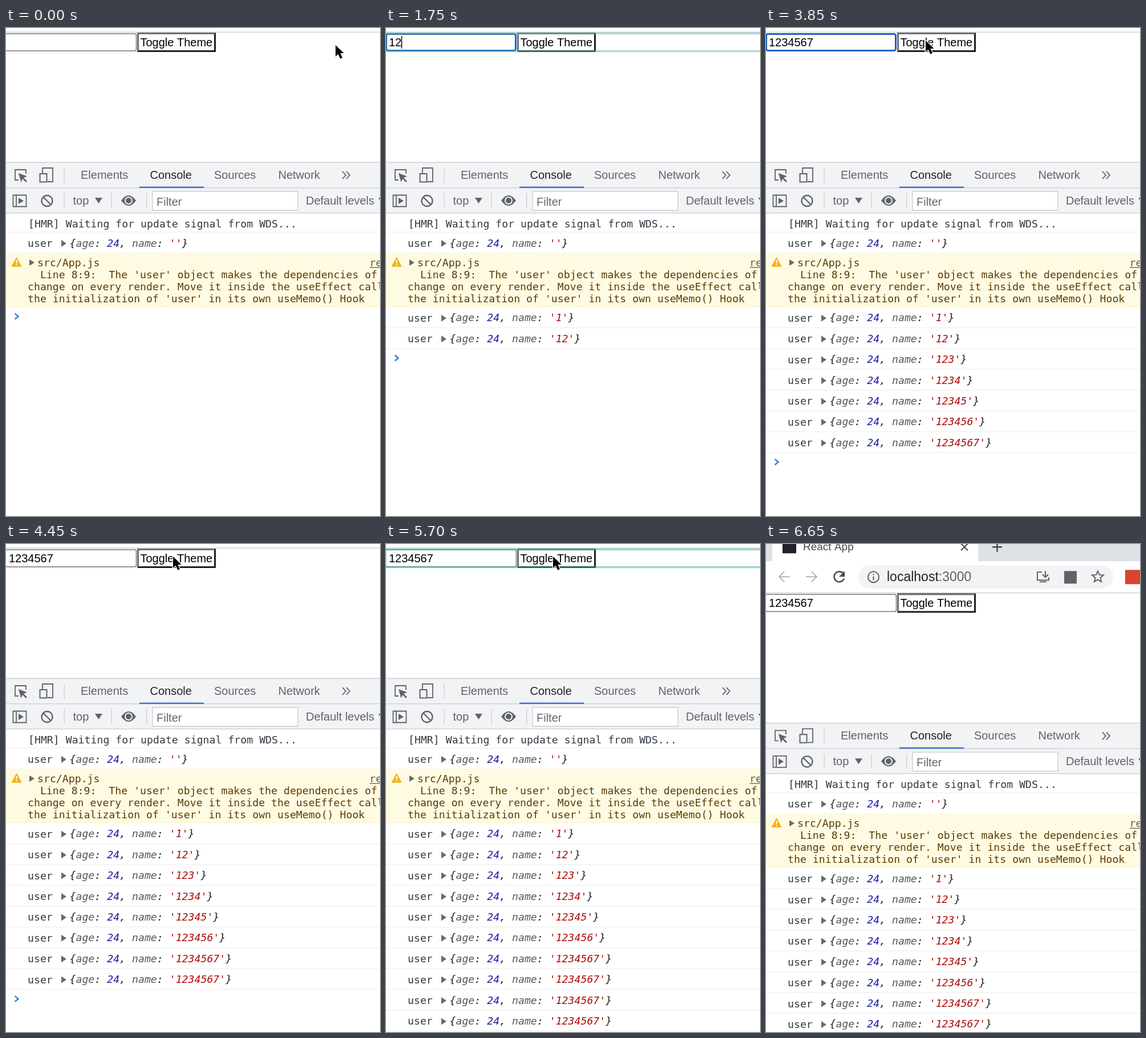
These frames come from a looping animation (656x854 px, 6.7 s). An HTML page with a canvas:

```html
<!DOCTYPE html>
<html lang="en">
<head>
<meta charset="utf-8">
<title>Console logging demo</title>
<style>
  html, body { margin: 0; width: 100%; height: 100%; overflow: hidden; background: #fff; }
  canvas { display: block; }
</style>
</head>
<body>
<canvas id="stage" width="656" height="854"></canvas>
<script>
const ctx = document.getElementById('stage').getContext('2d');
const W = 656, H = 854, LOOP = 6700, STEP = 50;
const SANS = '"Liberation Sans", Arial, sans-serif';
const MONO = '18.2px "DejaVu Sans Mono", monospace';
const ROW = 36.4;
const GRAY = '#5f6368', LINE = '#cacdd1';

// Timeline, in ms
const typedAt = [1050, 1550, 1950, 2150, 2450, 2700, 3050];
const loggedAt = [1550, 1750, 2000, 2200, 2500, 2750, 3100, 4250, 4700, 5200];
const clickedAt = [4200, 4650, 5200, 5650];
const flashColors = ['#37afa9', '#63b19e', '#80b393', '#97b488', '#abb67d', '#beb771', '#cfb965'];
const FOCUS = 650, BLUR = clickedAt[0];
const pointerPath = [
  [0, 577, 29], [150, 520, 34], [300, 350, 32], [450, 200, 26], [600, 149, 24],
  [3550, 149, 24], [3600, 158, 24], [3700, 160, 24], [3850, 279, 21], [3950, 292, 21],
  [6050, 292, 21], [6200, 310, -50], [6400, 330, -160]
];

const countBefore = (times, t) => times.filter(time => time <= t).length;
const clamp = v => Math.max(0, Math.min(1, v));
const ease = v => v * v * (3 - 2 * v);

function positionAt(t) {
  const next = pointerPath.findIndex(key => key[0] > t);
  if (next < 0) return pointerPath[pointerPath.length - 1].slice(1);
  const [t0, x0, y0] = pointerPath[next - 1], [t1, x1, y1] = pointerPath[next];
  const k = (t - t0) / (t1 - t0);
  return [x0 + (x1 - x0) * k, y0 + (y1 - y0) * k];
}

function rect(x, y, w, h, color) {
  ctx.fillStyle = color;
  ctx.fillRect(x, y, w, h);
}

function box(x, y, w, h, radius, fill, stroke, width = 1.5) {
  ctx.beginPath();
  ctx.roundRect(x, y, w, h, radius);
  if (fill) { ctx.fillStyle = fill; ctx.fill(); }
  if (stroke) { ctx.strokeStyle = stroke; ctx.lineWidth = width; ctx.stroke(); }
}

function fillPath(d, color) {
  ctx.fillStyle = color;
  ctx.fill(new Path2D(d));
}

function strokePath(d, color, width = 2) {
  ctx.strokeStyle = color;
  ctx.lineWidth = width;
  ctx.stroke(new Path2D(d));
}

function text(s, x, y, color, font = '20px ' + SANS) {
  ctx.font = font;
  ctx.fillStyle = color;
  ctx.fillText(s, x, y);
}

const mono = (s, x, y, color) => text(s, x, y, color, MONO);

function drawBrowser() {
  rect(0, -90, W, 42, '#dee1e6');
  box(11, -110, 361, 80, 10, '#fff');
  rect(0, -48, W, 55, '#fff');
  rect(29, -84, 24, 22, '#20232a');
  text('React App', 65, -67, '#45494d', '19px ' + SANS);
  strokePath('M342-79l12 12m0-12l-12 12', '#45494d');
  strokePath('M397-73h17m-8.5-8.5v17', '#45494d', 2.5);
  strokePath('M42-21H23m9-9l-9 9 9 9M70-21h19m-9-9l9 9-9 9', '#b2b5b8');
  strokePath('M136-26a9 9 0 1 0 1 8', '#45494d', 2.5);
  fillPath('M138-31v10h-10z', '#45494d');
  box(162, -41, 447, 41, 20.5, '#f1f3f4');
  box(179, -30, 19, 19, 9.5, null, GRAY, 2);
  rect(187.5, -26, 2, 2, GRAY);
  rect(187.5, -22, 2, 7, GRAY);
  text('localhost', 212, -13, '#202124', '23px ' + SANS);
  const hostWidth = ctx.measureText('localhost').width;
  text(':3000', 212 + hostWidth, -13, GRAY, '23px ' + SANS);
  strokePath('M484-29h-8v14h20v-5M480-12h12M490-31v11m-5-5l5 5 5-5', GRAY);
  rect(523, -31, 22, 22, GRAY);
  strokePath('M582-31l2.8 6.6 7.2.6-5.5 4.7 1.7 7-6.2-3.7-6.2 3.7 1.7-7-5.5-4.7 7.2-.6z', GRAY);
  rect(630, -33, 26, 25, '#d9432f');
  rect(0, 6.5, W, 1.5, '#d0d2d5');
}

function drawPage(t) {
  const value = '1234567'.slice(0, countBefore(typedAt, t));
  const focused = t >= FOCUS && t < BLUR;
  if (focused) box(0.5, 10.5, 227, 29, 3, '#fff', '#1c61c6', 3);
  else box(-1, 10, 229.5, 30, 3, '#fff', '#767676', 1.5);
  text(value, 5, 32, '#000');

  const caretOn = t < 3550 || t >= 4050;
  if (focused && caretOn) rect(4.5 + value.length * 11.12, 14, 1.5, 22, '#000');

  rect(230, 8, 138, 34, '#1e1e1e');
  fillPath('M230 8H368l-3 3H233V39l-3 3z', '#707070');
  rect(233, 11, 132, 28, '#fff');
  text('Toggle Theme', 235.5, 32, '#000');
}

// Outline that marks a re-rendered component
function drawFlash(t) {
  const typing = t < BLUR;
  const events = typing ? typedAt : clickedAt;
  const n = countBefore(events, t);
  if (!n) return;
  const age = t - events[n - 1];
  if (age >= (t > 5600 ? 150 : 250)) return;
  ctx.globalAlpha = 0.5;
  box(-1, 9.5, W + 10, 31, 0, null, flashColors[typing ? n - 1 : 0], 3.5);
  ctx.globalAlpha = 1;
}

function drawToolbars() {
  rect(0, 234.5, W, 89, '#f2f3f5');
  for (const y of [234.5, 279, 323]) rect(0, y, W, 1.3, LINE);
  rect(234, 277.5, 113, 2.5, '#3b73c9');
  [['Elements', 131], ['Console', 252.5], ['Sources', 365], ['Network', 477.5]]
    .forEach(([label, x]) => text(label, x, 264, label === 'Console' ? '#202124' : GRAY));
  strokePath('M590 251l6 6.5-6 6.5m7-13l6 6.5-6 6.5', GRAY, 1.8);

  // Inspect and device buttons
  strokePath('M22 266h-6v-18h19v7', GRAY, 1.8);
  fillPath('M22 254l15 5.5-6 2.5 6 6-2 2-6-6-2.5 6z', GRAY);
  strokePath('M64 254v-9h18v24h-9', GRAY, 1.8);
  strokePath('M59.500 255h12v14.500h-12z', GRAY, 2);

  for (const [x, y] of [[101.5, 245], [101.5, 289], [184.5, 289], [246, 289]])
    rect(x, y, 1.3, 26, LINE);

  strokePath('M12.500 292.500h23v20h-23zM18 292v21', GRAY, 1.8);
  fillPath('M22 297l9 5.500-9 5.500z', GRAY);
  box(62.5, 293, 19, 19, 9.5, null, GRAY, 2.3);
  strokePath('M65.500 296l13 13', GRAY, 2.3);
  text('top', 117.5, 309, GRAY);
  fillPath('M156 297h13l-6.500 10z', GRAY);
  fillPath('M202 302q13-18 26 0q-13 18-26 0z', GRAY);
  box(209, 296, 12, 12, 6, GRAY, '#f2f3f5', 2);
  box(257, 286, 255, 33, 0, '#fff', LINE, 1.3);
  text('Filter', 264, 311, '#666a6e');
  text('Default levels', 526, 309, GRAY);
  fillPath('M653 297h13l-6.500 10z', GRAY);
}

function drawUserRow(name, y) {
  mono('user', 38, y, '#303942');
  fillPath(`M97 ${y - 12}l9 6-9 6z`, '#6a6a6a');
  let x = 111.5;
  const parts = [
    ['{', '#202124'], ['age', '#565656'], [': ', '#202124'], ['24', '#1a1aa6'],
    [', ', '#202124'], ['name', '#565656'], [': ', '#202124'],
    [`'${name}'`, '#aa0d0d'], ['}', '#202124']
  ];
  for (const [s, color] of parts) {
    text(s, x, y - 0.5, color, 'italic ' + MONO);
    x += ctx.measureText(s).width;
  }
}

function drawConsole(t) {
  mono('[HMR] Waiting for update signal from WDS...', 39, 349, '#303942');
  rect(0, 356.5, W, 1.2, '#eeeeee');
  drawUserRow('', 383);

  rect(0, 393.5, W, 94.5, '#fff5c4');
  rect(0, 394.5, W, 92.3, '#fffbe3');
  ctx.lineJoin = 'round';
  fillPath('M18.500 402l8.500 15.500h-17z', '#eeb616');
  strokePath('M18.500 402l8 15h-16z', '#eeb616', 1.5);
  ctx.lineJoin = 'miter';
  rect(17.6, 406, 2, 6, '#fff');
  rect(17.6, 413.5, 2, 2, '#fff');
  fillPath('M41 405l9 5.500-9 5.500z', '#6a6a5a');
  mono('src/App.js', 55, 416.5, '#5c3c00');
  mono('re', 637.5, 416.5, '#625c4c');
  rect(638, 418.5, 18, 1.3, '#625c4c');
  [
    "  Line 8:9:  The 'user' object makes the dependencies of",
    'change on every render. Move it inside the useEffect call',
    "the initialization of 'user' in its own useMemo() Hook"
  ].forEach((line, i) => mono(line, 38, 437.5 + i * 21.2, '#5c3c00'));

  const rows = countBefore(loggedAt, t);
  for (let i = 0; i < rows; i++) {
    drawUserRow('1234567'.slice(0, i + 1), 513.8 + i * ROW);
    rect(0, 524 + i * ROW, W, 1.2, '#eeeeee');
  }
  const y = 504.7 + rows * ROW;
  strokePath(`M15.500 ${y - 5}l6 5-6 5`, '#3d78e0', 2.4);
}

function drawPointer(t) {
  if (t >= typedAt[0] && t < 3550) return;
  const [x, y] = positionAt(t);
  ctx.save();
  ctx.translate(x, y);
  if (x < 229 && y > 8) {
    const beam = 'M-5-11q4 0 5 3q1-3 5-3M0-8V8M-5 11q4 0 5-3q1 3 5 3M-3 1h6';
    strokePath(beam, '#fff', 4);
    strokePath(beam, '#111', 1.8);
  } else {
    const arrow = 'M1 1v20l4.600-4.400 3.600 8.200 3.800-1.700-3.600-8h6.200z';
    strokePath(arrow, '#fff', 2.6);
    fillPath(arrow, '#000');
  }
  ctx.restore();
}

function draw(t) {
  const pan = 78.3 * ease(clamp((t - 6050) / 350));
  rect(0, 0, W, H, '#fff');
  ctx.save();
  ctx.translate(0, pan);
  drawBrowser();
  drawPage(t);
  drawFlash(t);
  drawToolbars();
  drawConsole(t);
  drawPointer(t);
  ctx.restore();
}

const start = performance.now();
function tick() {
  const elapsed = (performance.now() - start) % LOOP;
  draw(Math.floor(elapsed / STEP) * STEP);
  requestAnimationFrame(tick);
}
tick();
</script>
</body>
</html>
```
